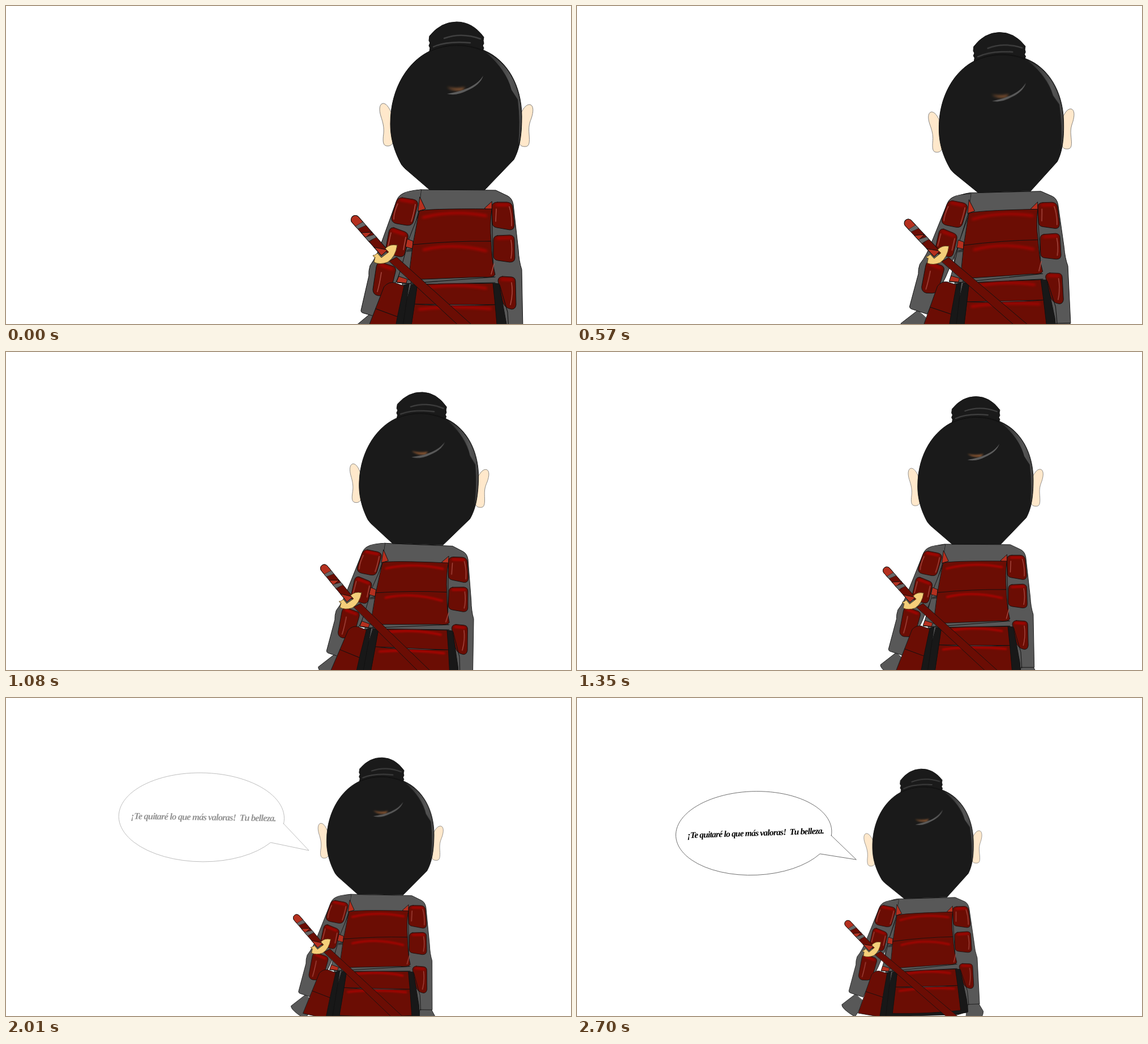
An HTML page for the animation above (3480 ms loop, 998 by 561 pixels).

```html
<!DOCTYPE html>
<html lang="es">
<head>
<meta charset="utf-8">
<title>Samurái</title>
<style>
html, body { margin: 0; width: 100%; height: 100%; overflow: hidden; background: #fff; }
svg { display: block; width: 998px; height: 561px; }
path { stroke-linejoin: round; stroke-linecap: round; }
.cloth, .plate, .strap, .black, .hair { stroke: #111; stroke-width: 1; }
.cloth { fill: #585858; }
.plate { fill: #6b0d04; }
.strap { fill: #b5301f; }
.black { fill: #181818; }
.hair { fill: #1a1a1a; }
.skin { fill: #ffe8cb; stroke: #666; stroke-width: .8; }
.line { fill: none; stroke: #111; stroke-width: 1.1; }
.glow { fill: none; stroke: #c00504; stroke-width: 4; opacity: .8; filter: url(#soft); }
.shine { fill: none; stroke: #b5564d; stroke-width: 1.6; opacity: .8; filter: url(#fine); }
.strand { fill: none; stroke: #505050; stroke-width: 2.4; filter: url(#fine); }
text { font: italic bold 20px "Liberation Serif", serif; letter-spacing: -.98px; white-space: pre; }
</style>
</head>
<body>
<svg viewBox="0 0 998 561">
<defs>
  <filter id="soft" x="-20%" y="-200%" width="140%" height="500%"><feGaussianBlur stdDeviation="2"/></filter>
  <filter id="fine" x="-50%" y="-50%" width="200%" height="200%"><feGaussianBlur stdDeviation=".7"/></filter>
  <linearGradient id="rim"><stop offset=".1" stop-color="#333"/><stop offset=".7" stop-color="#555"/><stop offset="1" stop-color="#444"/></linearGradient>
</defs>
<g id="scene">
  <g id="bubble">
    <path fill="#fff" stroke="#444" d="M585.5 174L641 231L558 215A179 96 0 1 1 585.5 174Z"/>
    <text x="255" y="169">¡Te quitaré lo que más valoras!  Tu belleza.</text>
  </g>

  <!-- torso and right arm -->
  <path class="cloth" d="M886 570L911 570L921 588Q920 600 912 606L880 606Z"/>
  <path class="cloth" d="M700 334Q715 326 733 324L865 325L886 335Q894 339 896 350L905 430Q906 450 911 465L913 571L886 571L884 590L692 590L700 490L700 360Z"/>

  <g id="arm">
    <path class="cloth" d="M642 544L612 569Q611 578 643 596L664 562Z"/>
    <path class="cloth" d="M733 324Q708 326 699 332Q692 336 689 346L664 415Q656 440 643 458Q640 468 641 476L627 537Q627 541 632 542L660 550L692 480L710 432L729 362Z"/>
    <path fill="#585858" d="M706 328L733 324L731 345L700 345Z"/>
    <path class="plate" d="M700 338L719 341Q729 343 727 352L720 379Q718 388 708 387L690 384Q680 382 681 373L689 346Q692 338 700 338Z"/>
    <path class="plate" d="M685 391L704 398Q712 401 710 410L705 435Q703 444 694 442L678 438Q669 435 671 426L676 399Q678 390 685 391Z"/>
    <path class="plate" d="M662 452L684 459Q690 462 688 469L680 501Q678 510 668 511L657 511Q648 509 648 500L654 460Q656 451 662 452Z"/>
    <path class="glow" stroke-width="2" d="M697 342L720 346M683 396L704 403M662 457L682 464"/>
    <path class="shine" d="M692 349Q685 365 685 376M723 350Q720 368 716 380M680 400L675 423M706 408L702 430M663 470Q660 490 656 504"/>
  </g>

  <path class="cloth" d="M731 362L712 410L700 455L690 488L715 490L730 420Z"/>
  <path fill="#333" filter="url(#fine)" d="M708 430L718 427L717 433L707 434Z"/>
  <path class="plate" d="M868 346L885 346Q894 347 895 355L898 386Q898 395 890 395L867 391Q859 390 859 382L858 354Q859 346 868 346Z"/>
  <path class="plate" d="M868 405L890 404Q898 405 898 412L899 444Q899 452 890 452L869 449Q861 448 861 440L861 413Q861 406 868 405Z"/>
  <path class="plate" d="M877 477L893 478Q900 479 900 486L901 527Q900 535 893 535Q880 533 877 521L869 485Q869 478 877 477Z"/>
  <path class="glow" stroke-width="2" d="M866 351L888 351M868 410L892 409M875 482L894 483"/>
  <path class="shine" d="M889 354Q894 370 893 388M892 413Q895 430 892 445M893 488Q896 508 891 527M866 358L865 380"/>
  <path class="line" d="M858 362L861 478M872 492L886 540L888 572"/>

  <!-- cuirass -->
  <path class="strap" d="M731 337L741 358L728 362ZM858 345L845 357L858 363ZM709 411L719 415L718 428L706 425ZM694 477L709 482L707 489L690 487Z"/>
  <path class="plate" d="M730 362Q737 357 858 358Q854 385 857 415L719 421Z"/>
  <path class="plate" d="M719 421Q790 414 857 415Q858 450 864 474Q860 480 842 478L711 483Z"/>
  <path class="line" d="M706 490L864 478M727 491L864 488"/>
  <path class="glow" d="M737 373Q790 359 848 370M738 430Q790 417 848 432"/>
  <path class="shine" stroke="#c33" d="M862 455L857 473"/>

  <!-- skirt -->
  <path class="black" d="M716 491L730 491L720 540L713 584L868 584L860 489L871 490L884 561L886 588L862 594L697 593Q696 560 705 530Z"/>
  <path class="plate" d="M727 491L860 489L864 527L722 526Z"/>
  <path class="plate" d="M722 526Q790 531 864 527L869 584Q790 590 713 586Z"/>
  <path class="glow" d="M737 498Q795 488 848 498M730 535Q790 528 856 534"/>
  <path class="black" d="M702 493L712 490L697 592L682 594Z"/>
  <path class="plate" d="M668 495Q676 486 686 488L703 494L692 545L683 593L634 583Z"/>
  <path class="line" d="M653 534L691 548"/>

  <!-- sword -->
  <path class="plate" d="M677 450L690 443L870 605L852 612Z"/>
  <g transform="translate(617 377) rotate(48.5)">
    <path class="plate" d="M0-7.5H76V7.5H0A7.5 7.5 0 0 1 0-7.5Z"/>
    <path class="strap" stroke-width=".6" d="M12-7.5H0A7.5 7.5 0 0 0 0 7.5H12ZM36-7.5L24 7.5H36ZM46-7.5L36 7.5L46 7.5ZM78-7.5L58 7.5H78Z"/>
    <path fill="#666" stroke="#222" stroke-width=".6" d="M12-7.5H20L15 7.5H9ZM42-7.5H48L44 7.5H35Z"/>
  </g>
  <path fill="#f5cf7a" stroke="#5a431c" d="M691 422Q678 419 670 428L676 434L663 444L656 436Q651 441 648 440Q650 444 652 443L650 452Q660 457 674 452Q688 443 691 422Z"/>

  <!-- head -->
  <path class="skin" d="M682 192C676 176 670 171 665 172C659 174 659 184 662 194C666 206 668 214 667 225C665 240 666 247 674 247C680 247 682 244 684 240Z"/>
  <path class="skin" d="M909 190C915 178 920 173 926 174C932 176 932 186 928 198C924 208 923 214 924 226C925 240 925 248 917 248C910 248 908 246 906 240Z"/>
  <path class="hair" d="M748 324L705 287Q698 281 694 271C684 250 679 230 679 208C679 143 712 95 752 78C780 66 818 66 846 79C885 96 911 140 911 195C911 230 907 252 897 271L846 324Z"/>
  <path fill="url(#rim)" filter="url(#fine)" d="M848 82C884 98 910 140 910 195Q910 225 905 245Q909 205 904 165L893 148Q884 113 848 82Z"/>
  <path class="hair" d="M748 80L749 74L747 70L749 65L747 61L748 53Q768 28 796 28Q824 28 844 55L843 61L844 66L842 70L844 74L842 79Q795 60 748 80Z"/>
  <path class="line" stroke="#000" d="M749 80Q795 58 843 78"/>
  <path class="strand" opacity=".7" d="M774 57Q805 46 838 58M755 72Q780 61 820 65"/>
  <path fill="#8a5630" filter="url(#soft)" d="M779 143Q795 147 811 143L806 149Q790 151 779 143Z"/>
  <path fill="#5c5c5c" filter="url(#fine)" d="M779 155C806 150 830 143 843 123Q838 139 815 149Q796 159 779 155Z"/>
</g>
</svg>
<script>
const LOOP = 3480, WALK = 2700, STEP = 30;
const times = [0, 540, 1080, 1620, 2160, 2430, 2700];
const pose = {
  x: [702, 662, 645, 599, 580, 555, 539.5],
  scale: [1, .953, .907, .853, .803, .786, .7695],
  lean: [0, -1.9, 2, -2, 2, 0, -1.87],
  swing: [0, 4, 0, 4, 0, 2, 4]
};
const $ = id => document.getElementById(id);

function at(values, t) {
  let i = 1;
  while (i < times.length - 1 && t > times[i]) i++;
  const f = (t - times[i - 1]) / (times[i] - times[i - 1]);
  return values[i - 1] + f * (values[i] - values[i - 1]);
}

function draw(now) {
  const t = Math.min(WALK, Math.floor(now % LOOP / STEP) * STEP);
  const y = 199 + 60 * t / WALK;
  $('scene').setAttribute('transform',
    `translate(${at(pose.x, t)} ${y}) rotate(${at(pose.lean, t)}) scale(${at(pose.scale, t)}) translate(-702 -199)`);
  $('arm').setAttribute('transform', `rotate(${at(pose.swing, t)} 704 350)`);
  $('bubble').setAttribute('opacity', Math.max(0, (t - 1500) / 1200));
}

let start;
function tick(now) {
  start ??= now;
  draw(now - start);
  requestAnimationFrame(tick);
}
draw(0);
requestAnimationFrame(tick);
</script>
</body>
</html>
```
